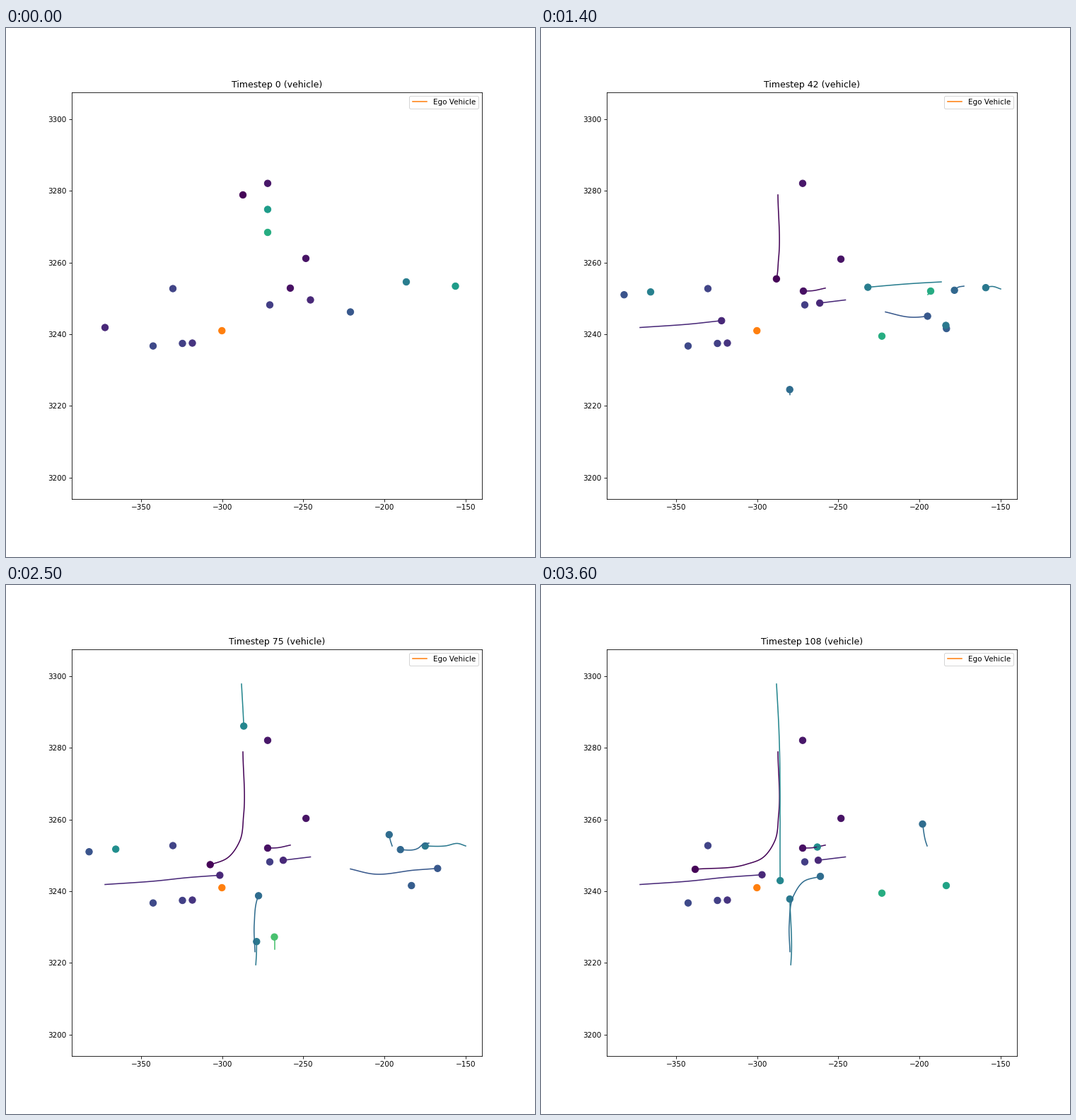
A matplotlib script for the animation above (3.7 s loop, 748x748 px).

```python
import numpy as np
import matplotlib.pyplot as plt
from matplotlib.animation import FuncAnimation
from matplotlib.transforms import Affine2D

SIZE, DPI = 748, 74.8
FRAMES, INTERVAL = 37, 100
STEPS = 3  # timesteps per frame
LAST = FRAMES - 1
EGO = "#ff7f0e"

plt.rcParams["font.family"] = "DejaVu Sans"
fig, ax = plt.subplots(figsize=(SIZE / DPI, SIZE / DPI), dpi=DPI)
fig.subplots_adjust(left=.1245, right=.9, bottom=.11, top=.8788)
ax.set_xlim(-392.5, -140.0)
ax.set_ylim(3194.1, 3307.6)
ax.set_xticks(range(-350, -149, 50))
ax.set_yticks(range(3200, 3301, 20))
title = ax.set_title("Timestep 0 (vehicle)")

# Vehicles are laid out in stage pixels, y pointing down.
stage = Affine2D().scale(1, -1).translate(0, SIZE)
dots = ax.scatter([], [], s=80, zorder=1, transform=stage)
vehicles = []


def steady(u):
    return u


def gas(power):
    return lambda u: u ** power


def brake(power):
    return lambda u: 1 - (1 - u) ** power


def turn(u):
    """Quick approach, slow through the corner, steady exit."""
    return u + .7 * u * (1 - u) ** 2.5


def along(points, s):
    """Smooth curve through the points, s running from 0 to 1 by length."""
    p = np.array(points, float)
    k = np.r_[0, np.cumsum(np.hypot(*np.diff(p, axis=0).T))]
    slope = np.gradient(p, k, axis=0)
    t = s * k[-1]
    i = np.clip(np.searchsorted(k, t, "right") - 1, 0, len(k) - 2)
    h = (k[i + 1] - k[i])[:, None]
    u = (t - k[i])[:, None] / h
    return ((1 + 2 * u) * (1 - u) ** 2 * p[i] + u * (1 - u) ** 2 * h * slope[i]
            + u * u * (3 - 2 * u) * p[i + 1] + u * u * (u - 1) * h * slope[i + 1])


def add(color, first, leave, path, label=None):
    line, = ax.plot([], [], color=color, lw=1.5, label=label, transform=stage)
    vehicles.append((color, first, leave, path, line))


def drive(shade, first, stop, *points, ease=steady, leave=None):
    """Follow the points from first to stop, then wait until leave."""
    leave = leave or stop
    t = np.arange(first * STEPS, leave * STEPS + 1) / STEPS
    u = np.clip((t - first) / (stop - first), 0, 1)
    add(plt.cm.viridis(shade), first, leave, along(points, ease(u)))


def park(shade, x, y, first=0, leave=LAST):
    path = np.tile((x, y), ((leave - first) * STEPS + 1, 1))
    add(plt.cm.viridis(shade), first, leave, path)


# Junction
drive(.01, 0, LAST, (335, 236), (336, 325), (330.5, 362), (313, 386),
      (290, 395), (218, 402), ease=turn)
drive(.05, 0, 20, (424, 325.8), (424.2, 330), ease=gas(4), leave=LAST)
drive(.04, 0, 20, (402, 367.8), (384, 371.5), (370, 372),
      ease=brake(2.9), leave=LAST)
drive(.11, 0, 20, (430.5, 384.5), (392, 389.2), ease=brake(2.4), leave=LAST)
drive(.11, 0, 33, (140, 423.5), (215, 418.2), (254, 414), (312.5, 409.7),
      ease=brake(2), leave=LAST)
park(.06, 370, 219.7)
park(.18, 373, 391.5)
park(.20, 236, 368.5)
park(.22, 208, 449.6)
park(.19, 249.5, 446)
park(.15, 263.5, 445.5)
park(.55, 370, 256.5, leave=10)
park(.62, 370, 289, leave=3)

# East arm
drive(.27, 0, 28, (487, 401.5), (518, 408.5), (579, 403), (629, 399.5),
      ease=gas(1.24))
drive(.42, 0, 17, (566, 359), (530, 361), (440, 368.5))
drive(.55, 0, 7, (635.5, 365), (593, 373.5))
drive(.33, 8, 28, (598, 365), (590, 366.5), (583, 372), (550, 374))
drive(.40, 9, 28, (650, 369), (639, 365.5), (622, 368.8), (588, 369),
      ease=brake(1.4))
drive(.35, 18, LAST, (546, 369), (544, 363), (539.5, 338), ease=brake(1.5))
park(.29, 573.3, 425, 4, 28)
park(.40, 572.5, 420.5, 4, 22)
park(.70, 548.5, 388, 4, 7)
drive(.61, 12, 16, (547, 377), (555, 367))
park(.58, 573, 425, 35)
for first in (13, 19, 35):
    park(.62, 482, 435.7, first, min(first + 2, LAST))

# West arm
park(.26, 117.5, 377.2, 2, 33)
park(.43, 155, 373.2, 3, 17)
park(.49, 155.2, 373.5, 18, 33)

# North and south arms
drive(.46, 22, LAST, (333, 140), (336, 195), (338.2, 418))
drive(.35, 13, LAST, (352, 518.5), (351, 480), (357.5, 438.5), (371, 419.5),
      (395, 412), ease=brake(1.3))
drive(.40, 19, LAST, (353.2, 537), (354, 524), (351.8, 444))
drive(.71, 23, 26, (379.5, 515), (379.5, 489))
drive(.49, 29, LAST, (395, 369.5), (390.7, 370.5))
for first, y in ((10, 610), (12, 593)):
    park(.60, 355, y, first, first)

add(EGO, 0, LAST, np.tile((305.3, 428), (LAST * STEPS + 1, 1)), "Ego Vehicle")
ax.legend(loc="upper right")


def draw(k):
    title.set_text(f"Timestep {k * STEPS} (vehicle)")
    spots, colors = [], []
    for color, first, leave, path, line in vehicles:
        seen = first <= k <= leave
        line.set_visible(seen)
        if seen:
            trail = path[:(k - first) * STEPS + 1]
            line.set_data(*trail.T)
            spots.append(trail[-1])
            colors.append(color)
    dots.set_offsets(spots)
    dots.set_color(colors)


anim = FuncAnimation(fig, draw, frames=FRAMES, interval=INTERVAL,
                     repeat=True, repeat_delay=0)
plt.show()
```
